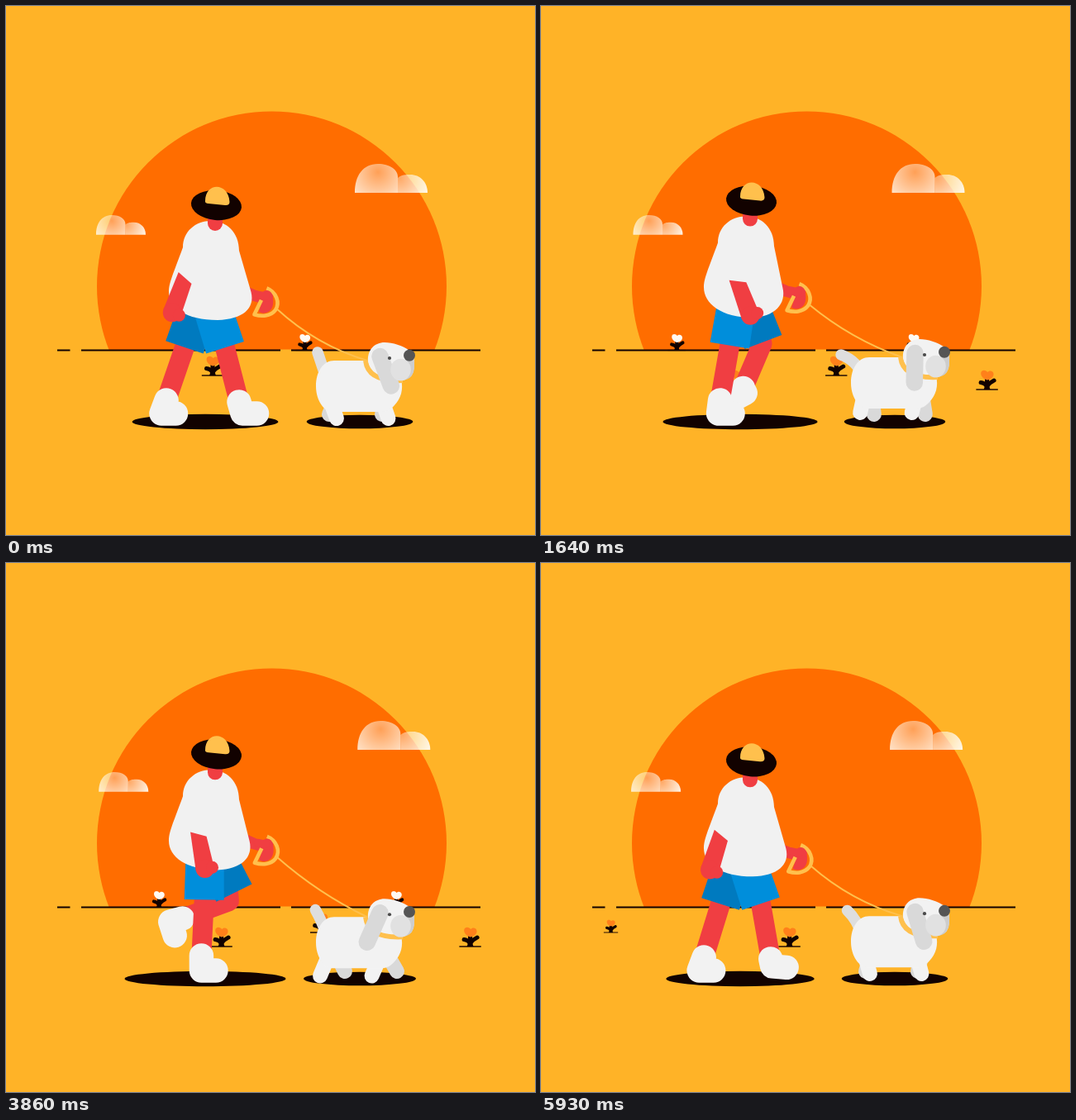
These frames come from a looping animation (640x640 px, 6 s). An HTML page with a canvas:

```html
<!DOCTYPE html>
<html lang="en">
<head>
<meta charset="utf-8">
<title>Evening walk</title>
<style>
  html, body { margin: 0; width: 100%; height: 100%; overflow: hidden; background: #ffb327; }
  canvas { display: block; width: 100vw; height: 100vh; }
</style>
</head>
<body>
<canvas id="stage"></canvas>
<script>
const LOOP = 6000, STEPS = 84, WALK = 1200, SIZE = 640;
const BG = '#ffb327', INK = '#120200', RED = '#f03e42', WHITE = '#f2f2f2',
      GREY = '#d9d9d9', GOLD = '#ffc04d', BLUE = '#008edb', NAVY = '#007abf';

const canvas = document.getElementById('stage');
const c = canvas.getContext('2d');
const TAU = Math.PI * 2;
const wave = x => Math.cos(TAU * x);
const clamp = x => Math.max(0, Math.min(1, x));

// Smooth periodic curve through rows of [time, value, value...], without overshoot
function curve(rows, time, period = 1) {
  const n = rows.length;
  const row = i => {
    const turn = Math.floor(i / n), r = rows[i - turn * n];
    return [r[0] + turn * period, ...r.slice(1)];
  };
  const t = time - Math.floor(time / period) * period;
  let i = n - 1;
  while (i > 0 && rows[i][0] > t) i--;
  const [a, b, d, e] = [row(i - 1), row(i), row(i + 1), row(i + 2)];
  const span = d[0] - b[0], u = (t - b[0]) / span;
  const slope = (p, q, k) => (q[k] - p[k]) / (q[0] - p[0]);
  const blend = (s, r) => s * r > 0 ? 2 * s * r / (s + r) : 0;
  return b.slice(1).map((v, j) => {
    const k = j + 1, mid = slope(b, d, k);
    const m0 = blend(slope(a, b, k), mid) * span;
    const m1 = blend(mid, slope(d, e, k)) * span;
    const u2 = u * u, u3 = u2 * u;
    return v * (2 * u3 - 3 * u2 + 1) + m0 * (u3 - 2 * u2 + u)
         + d[k] * (3 * u2 - 2 * u3) + m1 * (u3 - u2);
  });
}

function ellipse(x, y, rx, ry, color, tilt = 0) {
  c.fillStyle = color;
  c.beginPath();
  c.ellipse(x, y, rx, ry, tilt, 0, TAU);
  c.fill();
}
const dot = (x, y, r, color) => ellipse(x, y, r, r, color);

function shape(d, color) {
  c.fillStyle = color;
  c.fill(new Path2D(d));
}
function line(d, color, width, cap = 'round') {
  c.strokeStyle = color;
  c.lineWidth = width;
  c.lineCap = cap;
  c.lineJoin = 'round';
  c.stroke(new Path2D(d));
}
const poly = pts => 'M' + pts.map(p => p.join(' ')).join('L');

function at(x, y, scale, draw) {
  c.save();
  c.translate(x, y);
  c.scale(scale, scale);
  draw();
  c.restore();
}

// ---------- scenery ----------
function glow(x, y, r, inner, outer) {
  const g = c.createRadialGradient(x, y, 0, x, y, r);
  g.addColorStop(0, `rgba(255,250,240,${inner})`);
  g.addColorStop(1, `rgba(255,250,240,${outer})`);
  return g;
}
function cloud() {
  shape('M0 35C0 14 10 0 28 0C42 0 53 7 52 17V35Z', glow(28, 10, 38, .36, .84));
  shape('M52 17C56 13 62 13 67 13C79 13 88 22 88 35H52Z', glow(54, 17, 36, .42, .93));
}

const FLOWERS = [
  { y: 416.5, speed: .12, scale: .83, color: '#fffaf2', xs: [361.5, 648, 935] },
  { y: 447, speed: .1432, scale: 1, color: '#ff801a', xs: [250, 592.5, 933.5] },
  { y: 464, speed: .126, scale: 1, color: '#ff801a', xs: [445.6, 746.6, 1047.6] }
];
function flower(color) {
  line('M-13.2 0H13.2', INK, 1.4, 'butt');
  shape('M-4 0Q-2.5 -2 -2.5 -13H2.5Q2.5 -2 4 0Z', INK);
  line('M0 -4Q-3 -8 -7.5 -8.5M0 -4Q4 -9 8.5 -11', INK, 5);
  shape('M0 -11.5C-5 -13 -8 -17 -7.3 -20.5C-6.5 -24.5 -1 -24 .5 -21' +
        'C3 -24 8 -22.5 8 -18.5C8 -14.5 4 -12 0 -11.5Z', color);
}
function scenery(t) {
  c.fillStyle = BG;
  c.fillRect(0, 0, SIZE, SIZE);
  c.save();
  c.beginPath();
  c.rect(0, 0, SIZE, 416.5);
  c.clip();
  dot(321.5, 339, 211.5, '#ff6d00');
  c.restore();

  const drift = 4.6 * (1 - Math.abs(2 * t / LOOP - 1));
  at(422 + drift, 191, 1, cloud);
  at(109 + drift, 253, .682, cloud);

  for (const f of FLOWERS) for (const start of f.xs) {
    const x = start - f.speed * t;
    const grow = Math.min(clamp((590 - x) / 13), clamp((x - 76) / 13));
    if (grow > 0) at(x, f.y, f.scale * grow, () => flower(f.color));
  }
  line('M62 416.5H77.5M91 416.5H332M345 416.5H574', INK, 2, 'butt');
  line('M332 416.5H345', BG, 2, 'butt');
}

// ---------- walker ----------
const BOB = [[0, 0], [.033, -.2], [.058, -1], [.108, -5], [.217, -9.7], [.367, -5.5], [.442, -.7]];

// phase, hem x, ankle x y, heel x y, sole angle
const STRIDE = [
  [0, 265, 282, 479, 286, 493, 0],
  [.033, 262.5, 280, 480, 283, 493, 0],
  [.058, 261.5, 273, 480, 277, 493, 0],
  [.108, 250, 257, 479, 259, 493, 0],
  [.217, 239.5, 236, 475, 236, 493, 0],
  [.367, 228.5, 217, 477, 215, 493, 0],
  [.442, 217, 197, 477, 191, 493, 0],
  [.5, 216, 194, 477, 188, 493, 0],
  [.533, 217, 193, 477, 188, 491, 0],
  [.558, 222, 194, 475, 189, 484, 9],
  [.608, 243, 196, 459, 193, 460, 42],
  [.717, 276, 214, 430, 199, 434, 72],
  [.867, 269, 244, 462, 231, 476, -28],
  [.942, 266, 278, 479, 280, 488, 5]
];
const SWING = [[0, -1], [.033, -.97], [.058, -.86], [.108, -.353], [.217, .176], [.367, .53],
  [.442, .91], [.5, 1], [.533, .97], [.558, .853], [.608, .353], [.717, -.176], [.867, -.53], [.942, -.91]];

function leg(phase, bob, cloth) {
  const [hem, ax, ay, hx, hy, deg] = curve(STRIDE, phase);
  const px = 241, py = 338 + bob;
  const sin = (hem - px) / 79, cos = Math.sqrt(1 - sin * sin);
  const place = (x, y) => [px + x * cos + y * sin, py + y * cos - x * sin];
  const lift = clamp((488 - hy) / 54);
  const [kx, ky] = place(0, 79);
  const sole = deg * Math.PI / 180;
  const toe = [hx + 17.5 * Math.cos(sole), hy + 17.5 * Math.sin(sole)];
  line(poly([place(0, 60), [kx - 6 * lift, ky + 10 * lift], [ax, ay]]), RED, 24);
  line(poly([[ax, ay], [hx, hy], toe]), WHITE, 29.5);
  shape(poly([place(-23, 20), place(23, 20), place(24, 79), place(-24, 79)]) + 'Z', cloth);
}

function torso(p) {
  const r = 2.5 * wave(p), b = 381.5 - 1.5 * wave(p);
  shape(`M214 292C214 273 229 260 248 260C267 260 282 274 282 296` +
        `L${294 + r} 346C${299 + r} 366 ${284 + r} ${b - 1} 256 ${b}` +
        `C218 ${b} 197 365 197 346C197 335 202 325 214 292Z`, '#f1f1f1');
}
function head() {
  shape('M244 250H262V263A9 9 0 0 1 244 263Z', RED);
  ellipse(254.5, 241, 30.6, 18, INK, .09);
  shape('M241 236C241 213 269 213 270.5 237Q270.5 241.5 265 241' +
        'L245 239Q240.5 238.5 241 236Z', GOLD);
}
function nearArm(p) {
  const [w] = curve(SWING, p);
  const a = [221 + 12.3 * w, 334 + 8 * w - 4 * w * w];
  const b = [240 + 15.5 * w, 340.5 + .5 * w - 4 * w * w];
  const hand = [235 + 34 * w, 379 + 4 * w - 4 * w * w];
  const dx = hand[0] - (a[0] + b[0]) / 2, dy = hand[1] - (a[1] + b[1]) / 2;
  const len = Math.hypot(dx, dy), nx = dy / len, ny = -dx / len;
  const side = k => [hand[0] + nx * k, hand[1] + ny * k];
  shape(poly([a, b, side(11.2), side(-11.2)]) + 'Z', RED);
  dot(...hand, 11.2, RED);
  dot(...side(9), 7.5, RED);
}
function leashHand() {
  shape('M-22 -17L-4 -9L4 -11Q11 -10 10 -3Q12 11 3 15Q-3 17 -7 14L-4 4L-18 0Z', RED);
  line('M2.5 -14.5C14 -10 19 3 13 12C7 20 -4 20 -12.5 17.5L-4 0', GOLD, 4.6, 'butt');
  dot(2.5, -5, 6.8, RED);
  line('M-9 -7L1 -5', RED, 9);
}
function walker(p, bob, hand) {
  at(...hand, 1, leashHand);
  leg(p + .5, bob, NAVY);
  leg(p, bob, BLUE);
  at(0, bob, 1, () => { torso(p); head(); nearArm(p); });
}

// ---------- dog ----------
const PAW_NEAR = [[0, 400, 499], [.067, 399, 499], [.117, 396, 499], [.217, 390, 499.5],
  [.433, 380, 499.5], [.733, 386, 492], [.883, 398, 497]];
// rear x, front x, y
const PAW_FAR = [[0, 391, 455, 494], [.067, 390, 453, 493.5], [.117, 392, 449, 491],
  [.217, 402, 442, 488], [.433, 410, 473, 494], [.733, 403, 465, 494], [.883, 393, 456, 494]];
const DOG_SHADE = [[0, 64.3], [.067, 67], [.117, 65], [.217, 62], [.233, 61.2], [.383, 64.3], [.433, 68]];

function dog(r) {
  const beat = wave(2 * r), dy = 2 * beat - 2;
  const limb = (x0, x1, y1, color) => line(`M${x0} ${474 + dy}L${x1} ${y1}`, color, 18);
  const [rear, front, fy] = curve(PAW_FAR, r);
  limb(400, rear, fy, GREY);
  limb(461, front, fy, GREY);

  const tx = 370 + 7 * beat;
  line(`M388 ${452 + dy}Q${383 - beat} ${434 + dy} ${tx} ${420.5 - 1.5 * beat}`, '#dedede', 13.5);

  const [nx, ny] = curve(PAW_NEAR, r);
  limb(391, nx, ny, WHITE);
  limb(454, nx + 62.5, ny, WHITE);

  const ear = 451 + 15 * wave(r + .02);
  at(0, dy, 1, () => {
    shape('M397 429H440L478 452C481 463 478 475 470 483C466 488 460 491 455 491' +
          'H394C382 489 375 474 375 460C375 442 384 429 397 429Z', WHITE);
    line('M435 429Q438 455 480 453', GOLD, 6, 'butt');
    shape('M438 430C437 416 446 407 458 407C468 407 480 411 487 416L493 422' +
          'Q496 440 490 448Q482 452 472 450L455 448Q441 442 438 430Z', WHITE);
    shape('M493 424Q496 440 491 447Q486 454 474 453L480 430Z', '#cdcdcd');
    line(`M452.5 424L${ear} 459.5`, GREY, 20.5);
    ellipse(477.5, 440, 12.3, 13.3, '#e1e1e1');
    dot(464, 426, 2.1, '#4a4a4a');
    dot(488, 422.7, 7, '#555');
  });
}

// ---------- frame ----------
function draw(t) {
  const p = (t / WALK) % 1, r = (2 * p) % 1;
  const [bob] = curve(BOB, p, .5);
  const hand = [310 + 4 * wave(p - .12), 356.7 + bob - 1.8 * wave(p - .17)];
  const dogY = 2 * wave(2 * r) - 2;

  scenery(t);
  ellipse(241, 503, 93.2 - 4.8 * wave(2 * p), 9.3, INK);
  ellipse(428, 503, curve(DOG_SHADE, r, .5)[0], 8.3, INK);
  walker(p, bob, hand);
  dog(r);

  const x = hand[0] + 14.5, y = hand[1] + 10.5, endY = 429 + dogY;
  const sag = 13 + bob * .5;
  line(`M${x} ${y}Q${(x + 437) / 2 - sag * .5} ${(y + endY) / 2 + sag} 437 ${endY}`, GOLD, 2);
}

function fit() {
  const ratio = window.devicePixelRatio || 1;
  const w = Math.round(innerWidth * ratio), h = Math.round(innerHeight * ratio);
  if (canvas.width !== w || canvas.height !== h) {
    canvas.width = w;
    canvas.height = h;
  }
  c.setTransform(w / SIZE, 0, 0, h / SIZE, 0, 0);
}

const begin = performance.now();
function tick() {
  const t = Math.max(0, performance.now() - begin) % LOOP;
  const step = Math.floor((t + 5) / LOOP * STEPS) % STEPS;
  fit();
  draw(step * LOOP / STEPS);
  requestAnimationFrame(tick);
}
tick();
</script>
</body>
</html>
```
